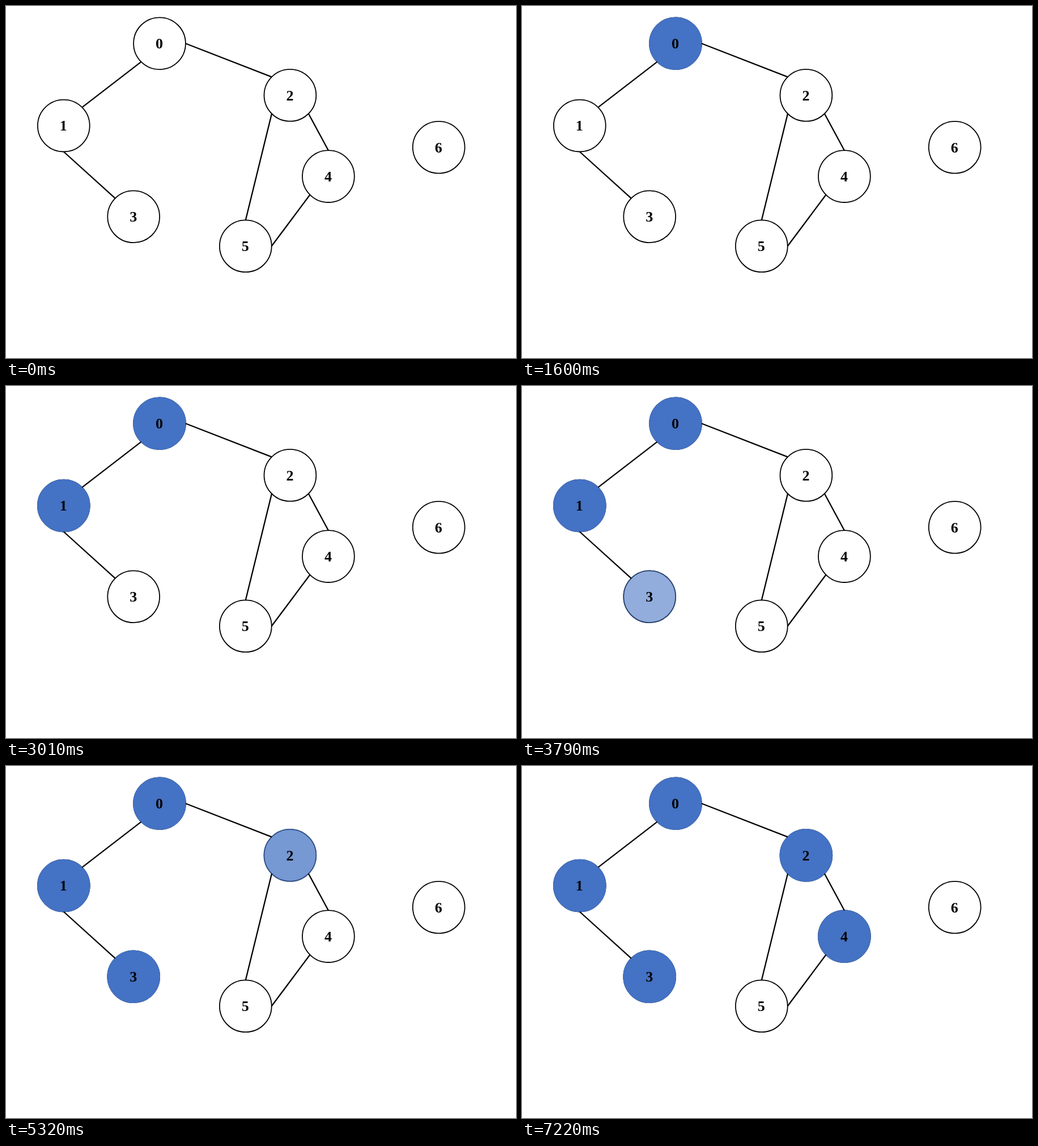
Recreate the animation shown at these times as an HTML page. Size 900x622 px, loop 8000 ms.

```html
<!DOCTYPE html>
<html lang="en">
<head>
<meta charset="utf-8">
<title>Graph traversal</title>
<style>
  html, body { margin: 0; width: 100%; height: 100%; overflow: hidden; background: #fff; }
  svg { display: block; width: 900px; height: 622px; }
  circle { fill: #fff; stroke: #000; stroke-width: 1.8; }
  circle.visited { fill: #4472c4; stroke: #4472c4; opacity: 0; }
  line { stroke: #000; stroke-width: 2.3; }
  text { font: bold 26px "Liberation Serif", "Noto Serif", serif; text-anchor: middle; }
</style>
</head>
<body>
<svg viewBox="0 0 900 622"></svg>
<script>
const LOOP = 8000, FADE = 500, TICK = 76, LEAD = 60, R = 45.9;

const nodes = [
  [271, 66.2], [101.8, 211.6], [501.4, 157.8], [225.2, 372.3],
  [568.9, 301.1], [422.8, 424.3], [763.7, 249.8]
];

// From node and side, to node and side; sides count clockwise from east in eighths
const edges = [
  [0, 3, 1, 7], [0, 0, 2, 5], [1, 2, 3, 5],
  [2, 1, 4, 6], [2, 3, 5, 6], [4, 3, 5, 0]
];

// Node and the time its tint first shows
const visits = [[0, 830], [1, 2160], [3, 3560], [2, 4970], [4, 6360]];

const svg = document.querySelector("svg");

function add(tag, attrs, text = "") {
  const el = document.createElementNS("http://www.w3.org/2000/svg", tag);
  for (const key in attrs) el.setAttribute(key, attrs[key]);
  el.textContent = text;
  return svg.appendChild(el);
}

function disc(node, name) {
  const [cx, cy] = nodes[node];
  return add("circle", { cx, cy, r: R, class: name });
}

function rim(node, side) {
  const a = side * Math.PI / 4, [x, y] = nodes[node];
  return [x + R * Math.cos(a), y + R * Math.sin(a)];
}

nodes.forEach((_, i) => disc(i, "node"));
const tints = visits.map(([node, start]) => ({ el: disc(node, "visited"), start }));

for (const [a, from, b, to] of edges) {
  const [x1, y1] = rim(a, from), [x2, y2] = rim(b, to);
  add("line", { x1, y1, x2, y2 });
}
nodes.forEach(([x, y], i) => add("text", { x: x - 0.5, y: y + 8.8 }, i));

// Linear fade, held between ticks
function strength(age) {
  if (age < 0) return 0;
  return Math.min(1, (LEAD + Math.floor(age / TICK) * TICK) / FADE);
}

function draw(t) {
  for (const { el, start } of tints) el.style.opacity = strength(t - start);
}

const begin = performance.now();
function frame() {
  draw((performance.now() - begin) % LOOP);
  requestAnimationFrame(frame);
}
frame();
</script>
</body>
</html>
```
